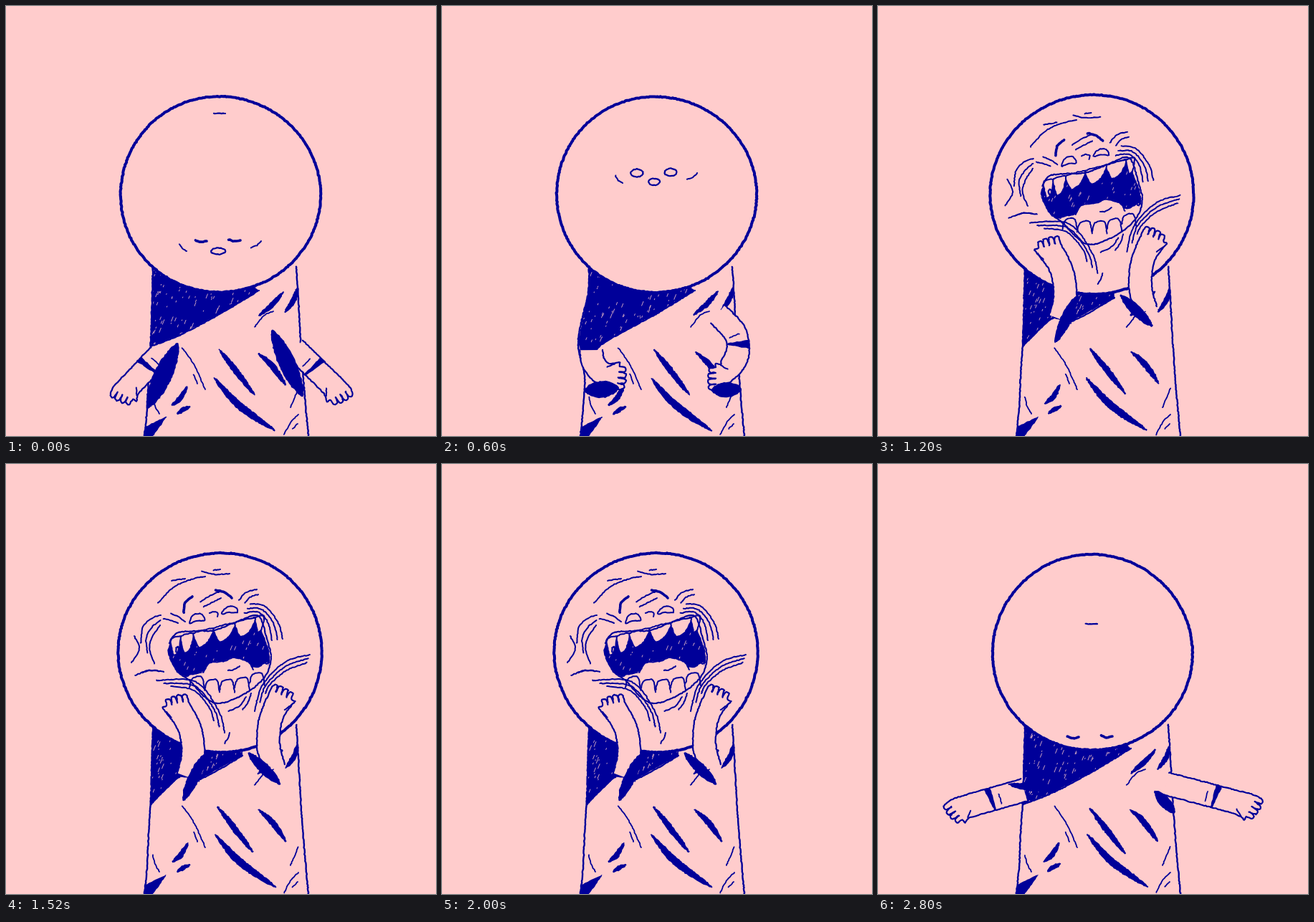
These frames come from a looping animation (600 by 600 pixels, 2880 ms). An HTML page with a canvas:

```html
<!DOCTYPE html>
<html lang="en">
<head>
<meta charset="utf-8">
<title>Big head</title>
<style>
html, body { margin: 0; width: 100%; height: 100%; overflow: hidden; background: #fcc; }
canvas { display: block; width: 600px; height: 600px; }
</style>
</head>
<body>
<canvas id="stage" width="600" height="600"></canvas>
<script>
const ctx = document.getElementById('stage').getContext('2d');
const INK = '#000099', PAPER = '#ffcccc', LOOP = 2880, ARM = 32;
const mix = (a, b, u) => a + (b - a) * u;
const mixPts = (a, b, u) => a.map((q, i) => q.map((v, j) => mix(v, b[i][j], u)));
const range = (n, f) => Array.from({ length: n }, (_, i) => f(i));
const pts = s => {
  const a = s.split(' ').map(Number);
  return range(a.length / 2, i => [a[2 * i], a[2 * i + 1]]);
};

// Seeded noise, so every drawing redraws identically
let seed = 1;
function rnd() {
  seed = (seed + 0x6D2B79F5) | 0;
  let t = Math.imul(seed ^ seed >>> 15, 1 | seed);
  t = t + Math.imul(t ^ t >>> 7, 61 | t) ^ t;
  return ((t ^ t >>> 14) >>> 0) / 4294967296;
}
const jit = r => (rnd() * 2 - 1) * r;

// Hermite curve through the points with a shaky hand; k = 0 gives straight sides
function curve(p, closed, k = 1) {
  const n = p.length, out = [];
  const at = i => closed ? p[(i + n) % n] : p[Math.max(0, Math.min(n - 1, i))];
  for (let i = 0; i < (closed ? n : n - 1); i++) {
    const [a, b, c, d] = [at(i - 1), at(i), at(i + 1), at(i + 2)];
    const m = Math.max(2, Math.ceil(Math.hypot(c[0] - b[0], c[1] - b[1]) / 2.2));
    for (let s = 0; s < m; s++) {
      const t = s / m, t2 = t * t, t3 = t2 * t;
      out.push([0, 1].map(j =>
        (2 * t3 - 3 * t2 + 1) * b[j] + (3 * t2 - 2 * t3) * c[j] +
        k * ((t3 - 2 * t2 + t) * (c[j] - a[j]) + (t3 - t2) * (d[j] - b[j])) / 2 + jit(0.5)));
    }
  }
  if (!closed) out.push(p[n - 1]);
  return out;
}
function trace(p, closed) {
  ctx.beginPath();
  p.forEach(q => ctx.lineTo(q[0], q[1]));
  if (closed) ctx.closePath();
}
function shape(p, { fill, w = 0, closed = true, k = 1 } = {}) {
  trace(curve(p, closed, k), closed);
  if (fill) { ctx.fillStyle = fill; ctx.fill(); }
  if (w) { ctx.lineWidth = w; ctx.strokeStyle = INK; ctx.stroke(); }
}
const line = (p, w = 2) => shape(p, { w, closed: false });
const lines = (s, w) => s.split('/').forEach(q => line(pts(q), w));
// Strokes spread evenly from one line to another
const fan = (a, b, n) => range(n, i => line(mixPts(pts(a), pts(b), i / (n - 1))));
// A stroke that swells in the middle
function blade(p, w) {
  const c = curve(p), n = c.length - 1, a = [], b = [];
  c.forEach((q, i) => {
    const u = c[Math.max(0, i - 2)], v = c[Math.min(n, i + 2)];
    const l = Math.hypot(v[0] - u[0], v[1] - u[1]) || 1;
    const h = 0.8 + w / 2 * Math.sin(Math.PI * i / n) + jit(0.4);
    const x = (u[1] - v[1]) / l * h, y = (v[0] - u[0]) / l * h;
    a.push([q[0] + x, q[1] + y]);
    b.unshift([q[0] - x, q[1] - y]);
  });
  trace(a.concat(b), true);
  ctx.fillStyle = INK;
  ctx.fill();
}
const oval = (x, y, rx, ry) => shape(
  range(8, i => [x + rx * Math.cos(i * Math.PI / 4), y + ry * Math.sin(i * Math.PI / 4)]), { w: 2.2 });
// Ink area with scratchy gaps
function scratched(p, k, n, x0, y0, w, h) {
  ctx.save();
  shape(p, { fill: INK, k });
  ctx.clip();
  ctx.strokeStyle = PAPER;
  ctx.lineWidth = 0.8;
  for (let i = 0; i < n; i++) {
    const x = x0 + rnd() * w, y = y0 + rnd() * h, l = 1 + rnd() ** 2 * 6;
    trace([[x, y], [x + l * 0.4, y - l]]);
    ctx.stroke();
  }
  ctx.restore();
}

// arms: shoulder x y, wrist x y, bend, hand angle; pits (arm shadows): from, to, width
// face: eye height, eye opening, mouth width, wrinkles, scream; bulge of the left sleeve
const rest = {
  armL: [214, 487, 166, 537, 0, 115], pitL: [240, 470, 197, 562, 24],
  armR: [403, 478, 463, 537, 0, 62], pitR: [371, 452, 414, 545, 22],
  face: [328, 0, 10, 0, 0], bulge: [0]
};
const belly = {
  armL: [208, 480, 240, 517, 21, 5], pitL: [247, 533, 198, 537, 22],
  armR: [385, 430, 388, 519, -54, 180], pitR: [376, 536, 418, 535, 20],
  face: [233, 5.5, 8, 0, 0], bulge: [1]
};
const spread = {
  armL: [206, 443, 97, 444, 0, 180], pitL: [178, 428, 206, 460, 18],
  armR: [390, 435, 513, 432, 0, 0], pitR: [387, 452, 414, 466, 12],
  face: [400, 0, 8, 0, 0], bulge: [0]
};
const scream = {
  armL: [254, 437, 240, 340, 27, 255], pitL: [277, 405, 247, 470, 14],
  armR: [374, 425, 382, 328, -24, -65], pitR: [338, 403, 383, 447, 13],
  face: [300, 6, 12, 1, 1], bulge: [0]
};
const hang = {
  armL: [219, 460, 242, 543, 0, 75], pitL: [200, 474, 218, 530, 9],
  armR: [394, 445, 367, 543, 0, 103], pitR: [412, 462, 392, 530, 14],
  face: [254, 8, 16, 1, 0], bulge: [0]
};
const wide = {
  armL: [204, 455, 113, 481, 0, 140], pitL: [182, 447, 240, 455, 9],
  armR: [402, 446, 516, 476, 0, 30], pitR: [386, 456, 414, 487, 14],
  face: [381, 0, 10, 0, 0], bulge: [0]
};
const keys = [[0, rest], [600, belly], [960, spread], [1200, scream], [2240, scream], [2400, hang], [2800, wide], [LOOP, rest]];

function poseAt(t) {
  const i = keys.findIndex(k => k[0] > t);
  const [t0, a] = keys[i - 1], [t1, b] = keys[i];
  const u = (t - t0) / (t1 - t0), e = u * u * (3 - 2 * u);
  return Object.fromEntries(Object.keys(a).map(k => [k, a[k].map((v, j) => mix(v, b[k][j], e))]));
}

// Four fingers by rule, then the thumb
const HAND = [[2, -19], ...range(4, i => {
  const y = i * 9 - 15, tip = 19 - Math.abs(i - 1.4) * 1.5;
  return [[tip - 1, y - 3], [tip, y + 3], [7, y + 5]];
}).flat(), [7, 23], [-1, 21]];

function arm([sx, sy, wx, wy, bend, deg], side, cuffed) {
  const a = deg * Math.PI / 180, size = ARM / 36, cos = Math.cos(a), sin = Math.sin(a);
  const len = Math.hypot(wx - sx, wy - sy);
  const ex = (sx + wx) / 2 - (wy - sy) / len * bend, ey = (sy + wy) / 2 + (wx - sx) / len * bend;
  const edge = (t, off) => {
    const q = 1 - t, dx = q * (ex - sx) + t * (wx - ex), dy = q * (ey - sy) + t * (wy - ey);
    const h = off * side * ARM / 2 / Math.hypot(dx, dy);
    return [q * q * sx + 2 * q * t * ex + t * t * wx - dy * h,
            q * q * sy + 2 * q * t * ey + t * t * wy + dx * h];
  };
  const hand = ([u, v]) => [wx + size * (u * cos - side * v * sin), wy + size * (u * sin + side * v * cos)];
  const ts = [0, 0.3, 0.6, 0.82];
  shape([...ts.map(t => edge(t, -1)), ...HAND.map(hand), ...ts.reverse().map(t => edge(t, 1))],
    { fill: PAPER, w: 2.2, closed: false });
  line([[-1, 20], [-12, 14]].map(hand));
  const cuff = 1 - 50 / len, g = 9 / len;
  if (!cuffed || cuff < 0.1) return;
  shape([edge(cuff, -1), edge(cuff + g, -1), edge(cuff + g / 3, 1), edge(cuff, 1)], { fill: INK, k: 0 });
  line([edge(cuff - g, -0.3), edge(cuff - g, 0.6)], 1.7);
}

function body(bulge, k) {
  const left = pts('205 364 204 400 202 468 199 515 197 560 193 600');
  left[2][0] -= 12 * bulge;
  const hem = [[202 - 4 * bulge, 475 + 28 * bulge], [243 - 21 * bulge, 459 + 14 * bulge - 23 * k],
    [300 - 30 * k, 429 + 11 * k], [353 - 23 * k, 397 + 10 * k]];
  scratched([...left.slice(0, 3), ...hem, [330, 380]], 0, 150, 195, 370, 150, 110);
  line(left, 2.4);
  line(hem, 2.2);
  line(pts('405 364 408 410 411 465 416 535 422 600'), 2.4);

  // Cloth folds, each redrawn slightly off
  const fold = (s, w) => {
    const x = jit(1.5), y = jit(1.5);
    blade(pts(s).map(q => [q[0] + x, q[1] + y]), w);
  };
  fold('296 479 318 507 346 543', 7);
  fold('291 518 325 556 376 592', 9);
  fold('352 483 371 500 391 528', 7);
  fold('352 433 371 417 387 399', 6);
  fold('232 556 244 546 254 529', 6);
  fold('237 569 246 563 256 558', 5);
  fold('390 426 402 409 407 392', 6);
  shape(pts('193 601 195 587 224 573 204 601'), { fill: INK, k: 0.3 });
  lines('246 477 263 502 278 535/205 546 208 558 214 569/262 514 267 527/408 534 397 560/388 598 398 580 408 570/400 590 407 583/347 448 360 432 373 426', 1.8);
}

function head(k) {
  const phase = rnd() * 6.3;
  shape(range(24, i => {
    const a = i * Math.PI / 12, r = 1 + 0.004 * Math.sin(3 * a + phase), c = Math.cos(a) * r, s = Math.sin(a) * r;
    return [299 + (139.5 + 2.5 * k) * c - 4 * s, 263 + (136.5 + 2.5 * k) * s + 4 * c];
  }), { fill: PAPER, w: 4 });
}

function calmFace([y, open, mouth, wrinkles]) {
  const lip = y + 6 + mouth * 0.8;
  if (y < 390) {
    [[272, y], [319, y - 1]].forEach(([x, cy]) =>
      open > 1.5 ? oval(x, cy, 8.5, open) : line([[x - 8, cy - 1], [x, cy + 1.5], [x + 8, cy]], 3.6));
  }
  if (lip < 380) oval(296, lip, mouth, 4.6);
  if (y < 365) {
    line([[242, y + 4], [246, y + 10], [252, y + 14]]);
    line([[342, y + 9], [350, y + 6], [356, y]]);
  }
  // The crown rolls into view as the head nods
  const top = 150 + (y - 328) * 1.38, v = Math.max(0, (top - 225) / 3);
  if (top > 130) line([[290, top], [306, top]], 2.2);
  if (v > 1) line([[299, top - v], [299, top + v]], 2.2);
  if (wrinkles > 0.7) lines('281 184 295 184 310 187/210 251 214 272 226 290/295 295 302 295 308 292/245 343 257 352/372 341 381 330');
}

function screamFace(k, phase) {
  const s = 0.7 + 0.3 * k + 0.02 * Math.sin(2 * phase);
  ctx.save();
  ctx.translate(300, 260);
  ctx.rotate(0.016 * Math.sin(phase));
  ctx.scale(s, s);
  ctx.translate(-300, -260);

  // Mouth with a tongue and a pink jaw
  const gum = x => 242 - (x - 240) * 0.25;
  scratched(pts('226 264 231 248 250 238 290 234 325 221 352 213 358 235 367 262 363 282 318 285 258 297 238 288'), 1, 60, 226, 213, 140, 80);
  shape(pts('254 297 275 291 284 278 305 275 318 270 338 276 346 287 366 277 352 306 325 324 295 333 265 315'), { fill: PAPER });
  lines('275 291 284 278 305 275 318 270 338 276 345 287/310 288 318 287 326 282');
  lines('228 264 238 288 257 303 275 323 295 334 325 325 352 307 366 288 370 268', 2.2);
  let x = 230;
  [14, 18, 28, 30, 28, 12].forEach((w, i) => {
    const a = gum(x), b = gum(x + w), h = 19 + (i < 2 ? 3 : 0);
    shape([[x, a], [x + w * 0.25, a + h], [x + w * 0.7, b + h], [x + w, b]], { fill: PAPER, w: 2, k: 0.6 });
    x += w;
  });
  lines('228 250 238 236 262 233 290 232 320 221 346 211 356 217 363 240 370 266', 2.2);
  range(5, i => {
    const l = 256 + i * 21, y = 304 - 0.004 * (l - 290) ** 2;
    line([[l, y + 12], [l + 4, y], [l + 17, y - 2], [l + 21, y + 15]]);
  });
  oval(239, 259, 2, 4);
  oval(364, 273, 3, 6);

  // Eyes, nose and brows
  shape(pts('256 222 261 211 272 209 277 218 266 219'), { w: 2 });
  shape(pts('301 209 308 200 319 199 323 207 312 207'), { w: 2 });
  lines('284 208 290 206 296 208 295 213');
  lines('248 207 250 194 260 185/293 176 305 179 315 187', 3.6);

  // Skin folds
  lines('212 194 235 171 262 160 278 157/231 163 250 160/273 150 290 154 312 153/290 148 299 147');
  fan('271 192 285 184 298 178', '276 199 288 193 300 187', 2);
  fan('325 190 335 179 350 175', '333 194 342 185 352 182', 2);
  fan('341 195 362 199 380 222 386 244', '333 208 352 207 366 222 371 246', 3);
  fan('188 250 191 228 202 216 216 211', '207 278 200 258 205 240 215 225', 3);
  fan('220 216 230 218 240 222', '230 209 240 213 250 220', 2);
  lines('179 240 186 258 175 277');
  fan('180 295 200 288 220 290', '190 291 202 288 214 289', 2);
  fan('210 302 265 304 297 345 305 375', '230 310 262 316 284 340 290 358', 3);
  fan('424 266 390 276 358 308 347 345', '420 277 390 289 368 308 362 320', 3);
  fan('310 345 325 338 335 325', '330 343 338 332 342 320', 2);
  lines('305 390 310 382 312 375');
  ctx.restore();
}

function draw(t, n) {
  const p = poseAt(t), k = p.face[4], cycle = ((t - 1280) / 80 % 6 + 6) % 6;
  seed = k === 1 ? 900 + cycle * 77 : 100 + n * 131;
  ctx.fillStyle = PAPER;
  ctx.fillRect(0, 0, 600, 600);
  body(p.bulge[0], k);
  head(k);
  if (k > 0.45) screamFace(k, cycle * Math.PI / 3);
  else calmFace(p.face);
  arm(p.armL, -1, k < 0.5);
  arm(p.armR, 1, k < 0.5);
  [p.pitL, p.pitR].forEach(([x1, y1, x2, y2, w]) => blade([[x1, y1], [x2, y2]], w));
}

// Drawings are held for 80 ms, or 40 ms where the swing is fast
const isFast = t => t >= 240 && t < 360 || t >= 840 && t < 1040;
const starts = [];
for (let t = 0; t < LOOP; t += isFast(t) ? 40 : 80) starts.push(t);

ctx.lineCap = ctx.lineJoin = 'round';
const begin = performance.now();
let shown = -1;
function tick() {
  const t = (performance.now() - begin) % LOOP;
  const n = starts.filter(s => s <= t).length - 1;
  if (n !== shown) draw(starts[shown = n], n);
  requestAnimationFrame(tick);
}
tick();
</script>
</body>
</html>
```
